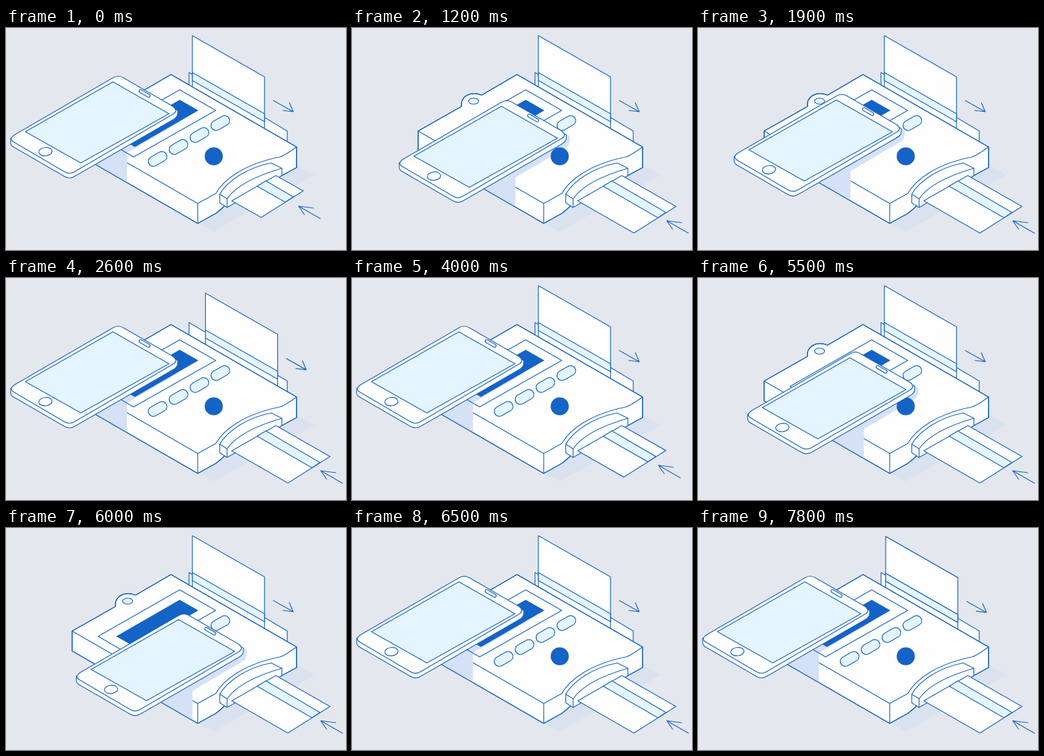
Animation of 509x334 px, one loop 7.9 s. Source, as an HTML page with a canvas:

```html
<!DOCTYPE html>
<html lang="en">
<head>
<meta charset="utf-8">
<title>Card reader</title>
<style>
  html, body { margin: 0; width: 100%; height: 100%; overflow: hidden; background: #e4e7ee; }
  canvas { display: block; }
</style>
</head>
<body>
<canvas id="stage" width="509" height="334"></canvas>
<script>
const ctx = document.getElementById('stage').getContext('2d');
const BLUE = '#1764c0', DARK = '#1463c6', PALE = '#e4f5ff', WHITE = '#fefeff', SHADE = '#d5e1f6';
const LOOP = 7900, TICK = 100, STEP = 715, DELAY = 100, SLOPE = 0.578;

const READER = 'M247 70L435 179V210L413 222L331 264Q322 273 314 279L287 294L99 185V155' +
  'L164 118C162 104 176 94 194 101Z';

function shape(d, fill, stroke = BLUE) {
  const path = new Path2D(d);
  if (fill) { ctx.fillStyle = fill; ctx.fill(path); }
  if (stroke) { ctx.strokeStyle = stroke; ctx.stroke(path); }
}

function ellipse(x, y, rx, ry, fill, angle = 0) {
  ctx.beginPath();
  ctx.ellipse(x, y, rx, ry, angle, 0, 2 * Math.PI);
  ctx.fillStyle = fill;
  ctx.fill();
  ctx.strokeStyle = BLUE;
  ctx.stroke();
}

// Outlined thick line with round ends
function capsule(d, size, fill) {
  ctx.save();
  ctx.lineCap = 'round';
  ctx.lineWidth = size + 1.2;
  shape(d, null, BLUE);
  ctx.lineWidth = size - 1.2;
  shape(d, null, fill);
  ctx.restore();
}

function shifted(dx, dy, draw) {
  ctx.save();
  ctx.translate(dx, dy);
  draw();
  ctx.restore();
}

function ease(p) {
  p = Math.min(1, Math.max(0, p));
  return p < 0.5 ? 4 * p ** 3 : 1 - 4 * (1 - p) ** 3;
}

function topCard(d) {
  shape('M274 86V67L421 155V172', WHITE);
  shifted(d, d * SLOPE, () => {
    shape('M279 92V11.5L387 73.5V154Z', WHITE);
    shape('M279 67L387 129V141L279 79Z', PALE);
  });
}

function reader(phoneX) {
  shape(READER, WHITE);
  shape('M99 155L287 264L314 249C326 228 356 205 410 194Q417 192 435 179M287 264V294');

  // Shadow cast by the phone
  ctx.save();
  ctx.clip(new Path2D(READER));
  shifted(phoneX, phoneX * SLOPE, () =>
    shape('M181 340V188L256 144Q264 139 262 126L168 80L0 170V340Z', SHADE, null));
  ctx.restore();
  shape(READER);

  shape('M260 93L314 124L191 194L138 163Z');
  shape('M260 108L288 124L193 179L165 163Z', DARK, null);
  for (let i = 0; i < 4; i++) {
    const x = 227 + 31.3 * i, y = 197 - 18 * i;
    capsule(`M${x - 6.5} ${y + 3.7}L${x + 6.5} ${y - 3.7}`, 15, PALE);
  }
  ellipse(311, 193, 13, 13, DARK);
  ellipse(182, 110, 7.5, 4.5, PALE);
}

function lip() {
  shape('M320 250C332 229 362 210 397 203L413 211V222L331 270L320 263Z', WHITE);
  shape('M320 250L331 257V270M331 257C343 239 372 223 413 211');
}

function bottomCard(d) {
  const e = d * 0.585;
  shape(`M338 260L${382 + d} ${285 + e}L${445 + d} ${245 + e}L404 222Z`, WHITE);
  shape(`M376 238L${418 + d} ${262 + e}L${430 + d} ${254 + e}L389 230Z`, PALE);
}

function arrows(top, bottom) {
  shifted(top, top * 0.62, () => shape('M400 109L430 126M414 124L430 126L424 112'));
  shifted(bottom * 0.83, bottom * 0.55, () => shape('M471 287L438 268M461 271L438 268L447 281'));
}

function phone(x) {
  shifted(x, x * SLOPE, () => {
    shape('M7 166V173Q7 177 13 180L87 223Q95 228 103 223L250 138Q257 134 257 129V124L168 76Z', WHITE);
    shape('M14 160L160 75Q168 70 176 75L250 118Q258 124 251 129L103 216Q95 221 87 216L14 173Q2 167 14 160Z', WHITE);
    shape('M160 81L244 129L112 203L29 156Z', PALE);
    ellipse(59, 186, 10, 6.3, WHITE, -0.1);
    capsule('M201.5 95L213.5 102', 4.5, WHITE);
  });
}

function render(now) {
  const t = Math.floor(now % LOOP / TICK) * TICK;
  const beat = Math.max(0, t - DELAY) % (6 * STEP) / STEP;
  const outAndBack = (out, back) => ease(beat - out) - ease(beat - back);
  const bottom = 40 * outAndBack(0, 5);
  const phoneX = 105 * outAndBack(1, 2);
  const top = 40 * outAndBack(3, 4);

  ctx.fillStyle = '#e4e7ee';
  ctx.fillRect(0, 0, 509, 334);
  ctx.lineWidth = 1.2;
  ctx.lineJoin = 'round';
  shape('M287 294L311 306L462 221L435 206Z', '#dae2ef', null);
  topCard(top);
  reader(phoneX);
  lip();
  bottomCard(bottom);
  arrows(top, bottom);
  phone(phoneX);
}

const start = performance.now();
function frame() {
  render(performance.now() - start);
  requestAnimationFrame(frame);
}
frame();
</script>
</body>
</html>
```
